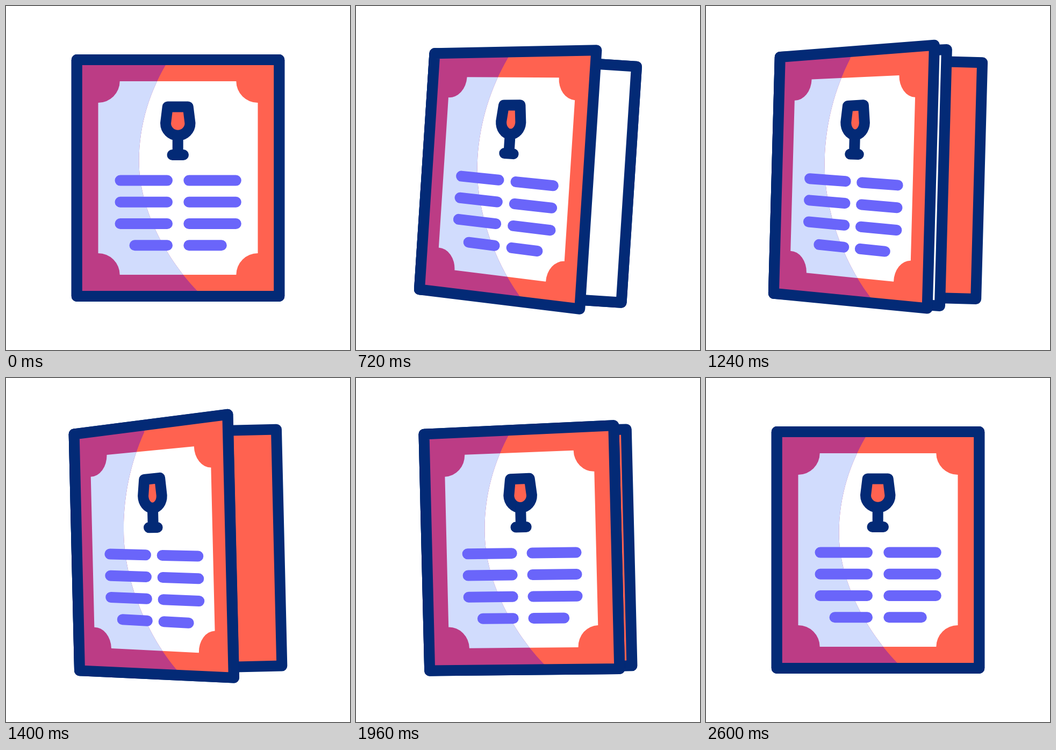
An HTML page with a canvas that plays this animation: 640 px wide and 640 px high, repeating every 3 s.

```html
<!DOCTYPE html>
<html lang="en">
<head>
<meta charset="utf-8">
<title>Wine menu</title>
<style>
  html, body { margin: 0; height: 100%; overflow: hidden; background: #fff; }
  canvas { display: block; width: 640px; height: 640px; }
</style>
</head>
<body>
<canvas width="640" height="640"></canvas>
<script>
const ctx = document.querySelector('canvas').getContext('2d');
const NAVY = '#032a76', CORAL = '#ff6250', PLUM = '#bc3c85', PALE = '#d1dcfd', VIOLET = '#6a65fa';
const LOOP = 3000, STEP = 40;
const LEFT = 131.8, RIGHT = 508.2, TOP = 100, BOTTOM = 540;

// Keys are [time, value] pairs, eased in and out between neighbours.
const TILT = [[240, 0], [960, 5], [990, 5], [1495, -2], [1590, -2], [2600, 0]];
const COVER = [[320, 0], [850, 1], [1608, 1], [2136, 0]];
const PAGE = [[886, 0], [1416, 1], [1608, 1], [2136, 0]];

function valueAt(keys, time) {
  let [prevTime, prev] = keys[0];
  if (time <= prevTime) return prev;
  for (const [nextTime, next] of keys) {
    if (time < nextTime) {
      const p = (time - prevTime) / (nextTime - prevTime);
      return prev + (next - prev) * p * p * (3 - 2 * p);
    }
    [prevTime, prev] = [nextTime, next];
  }
  return prev;
}

// Foreshortening toward the hinge on the left edge.
const squeeze = open => 1 - 90 * open / (RIGHT - LEFT);
const foldX = (x, open) => LEFT + (x - LEFT) * squeeze(open);

function leaf(open) {
  const x = foldX(RIGHT, open), path = new Path2D();
  path.moveTo(LEFT, TOP);
  path.lineTo(x, TOP - 30 * open);
  path.lineTo(x, BOTTOM + 20 * open);
  path.lineTo(LEFT, BOTTOM);
  path.closePath();
  return path;
}

function fill(path, color) {
  ctx.fillStyle = color;
  ctx.fill(path);
}

function stroke(path, color) {
  ctx.strokeStyle = color;
  ctx.stroke(path);
}

function drawLeaf(open, color) {
  const path = leaf(open);
  fill(path, color);
  stroke(path, NAVY);
}

function shadePath(open) {
  const X = x => foldX(x, open);
  return new Path2D(`M0 0 H${X(340)} L${X(303)} 100
    C${X(268)} 156 ${X(247.5)} 220 ${X(247.5)} 289
    C${X(247.5)} 376 ${X(297)} 472 ${X(363)} 537
    L${X(420)} 592 V640 H0 Z`);
}

// Panel with scooped corners; the right-hand corners spread as the cover opens.
function panelPath(open) {
  const x1 = 171.5 - 10.5 * open, x2 = 211.7 - 20 * open;
  const x3 = 428.3 - 74 * open, x4 = 468.5 - 83.5 * open;
  const d = 12 * open, arc = `A${x2 - x1} 40 0 0 `;
  return new Path2D(`M${x2} 140 L${x3} ${140 - d} ${arc}0 ${x4} ${180 - d}
    L${x4} ${460 + d} ${arc}0 ${x3} ${500 + d}
    L${x2} 500 ${arc}0 ${x1} 460 L${x1} 180 ${arc}0 ${x2} 140 Z`);
}

function drawGlass(open) {
  const X = x => foldX(x, open);
  const bowl = new Path2D(`M${X(300.7)} 187.6 L${X(338.7)} ${187.6 - 2.5 * open}
    L${X(342.5)} 218 A${22.75 * squeeze(open)} 22.75 0 0 1 ${X(297)} 218 Z`);
  fill(bowl, CORAL);
  stroke(bowl, NAVY);
  stroke(new Path2D(`M${X(319.7)} 241 V277 M${X(309.5)} 277 H${X(330)}`), NAVY);
}

function drawLines(open) {
  const path = new Path2D();
  for (let row = 0; row < 4; row++) {
    const inset = row === 3 ? 27 : 0, drop = (7.8 + 1.6 * row) * open;
    const point = x => [foldX(x, open), 324.6 + 40.2 * row + drop * (x - 212.5) / 215.5];
    for (const [from, to] of [[212.5 + inset, 300], [340.3, 427.8 - inset]]) {
      path.moveTo(...point(from));
      path.lineTo(...point(to));
    }
  }
  stroke(path, VIOLET);
}

function drawCover(open) {
  const cover = leaf(open), panel = panelPath(open);
  fill(cover, CORAL);
  fill(panel, '#fff');
  ctx.save();
  ctx.clip(cover);
  ctx.clip(shadePath(open));
  fill(cover, PLUM);
  fill(panel, PALE);
  ctx.restore();
  drawGlass(open);
  drawLines(open);
  stroke(cover, NAVY);
}

function draw(now) {
  const time = Math.floor(now % LOOP / STEP) * STEP;
  ctx.fillStyle = '#fff';
  ctx.fillRect(0, 0, 640, 640);
  ctx.save();
  ctx.lineWidth = 20;
  ctx.lineCap = ctx.lineJoin = 'round';
  ctx.translate(320, 320);
  ctx.rotate(valueAt(TILT, time) * Math.PI / 180);
  ctx.translate(-320, -320);
  drawLeaf(0, CORAL);
  drawLeaf(valueAt(PAGE, time), '#fff');
  drawCover(valueAt(COVER, time));
  ctx.restore();
  requestAnimationFrame(() => draw(performance.now()));
}

draw(performance.now());
</script>
</body>
</html>
```
